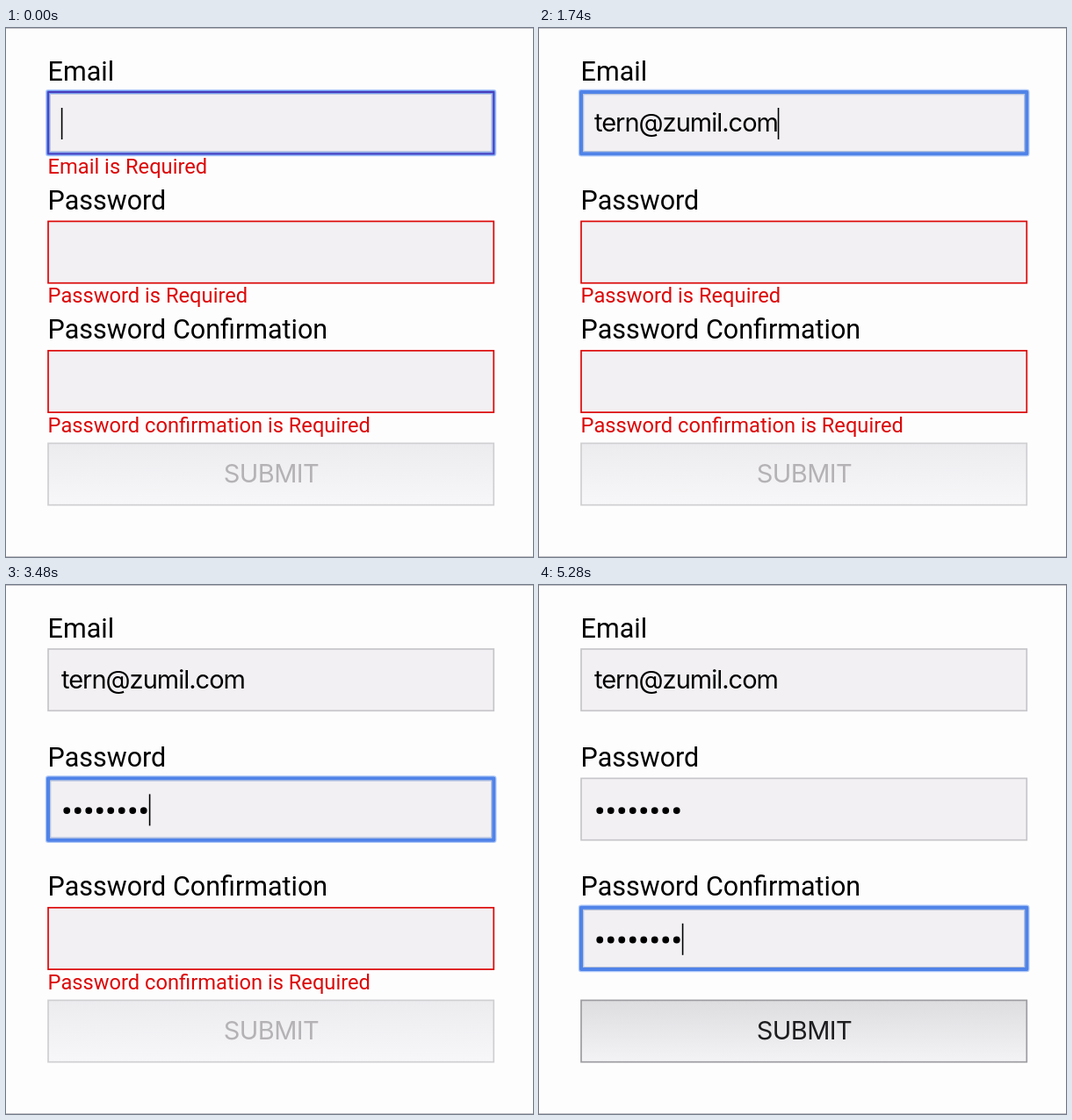
An HTML page with a canvas that plays this animation: 600 by 603 pixels, repeating every 5.34 s.

```html
<!DOCTYPE html>
<html lang="en">
<head>
<meta charset="utf-8">
<title>Form validation</title>
<style>
  html, body { margin: 0; width: 100%; height: 100%; overflow: hidden; background: #fefdfe; }
  canvas { display: block; width: 600px; height: 603px; }
</style>
</head>
<body>
<canvas id="stage" width="600" height="603"></canvas>
<script>
const ctx = document.getElementById('stage').getContext('2d');
const LOOP = 5340;
const LEFT = 48, WIDTH = 507.3, HEIGHT = 70.3, TEXT_X = 63;
const DOT_STEP = 12.5, DOTS = 8;

const EMAIL = 'tern@zumil.com';
const KEY_TIMES = [60, 120, 180, 240, 900, 1020, 1140, 1260, 1340, 1440, 1540, 1620, 1680, 1740];
const FOCUS_TIMES = [0, 1920, 3780];
const CARET_OFF = [[660, 900], [2460, 2760], [3780, 3960], [4680, 5280]];

const LABEL = '30.5px Roboto, sans-serif';
const ERROR = '23.7px Roboto, sans-serif';
const INPUT = '29px Inter, sans-serif';
const RED = '#dc0808';

const fieldTop = i => 73 + 147.4 * i;
const dotCount = (t, start, step) =>
  t < start ? 0 : Math.min(DOTS, Math.floor((t - start) / step) + 1);

function text(str, x, y, font, color, spacing = 0) {
  ctx.font = font;
  ctx.letterSpacing = spacing + 'px';
  ctx.fillStyle = color;
  ctx.fillText(str, x, y);
  return ctx.measureText(str).width;
}

function outline(y, width, color, inset = 0) {
  ctx.lineWidth = width;
  ctx.strokeStyle = color;
  ctx.strokeRect(LEFT + inset, y + inset, WIDTH - 2 * inset, HEIGHT - 2 * inset);
}

function focusRing(y, valid) {
  ctx.lineJoin = 'round';
  if (valid) {
    outline(y, 6.4, 'rgba(120,165,245,.6)');
    outline(y, 4, '#5083e8');
    outline(y, 1, '#bcc4d6', 2.6);
  } else {
    outline(y, 6, 'rgba(125,170,248,.6)');
    outline(y, 4, 'rgba(85,135,240,.7)');
    outline(y, 1, '#c3c9d8', 2.4);
    outline(y, 1.8, '#4a3cbc');
  }
  ctx.lineJoin = 'miter';
}

function dots(n, y) {
  ctx.fillStyle = '#000';
  for (let i = 0; i < n; i++) {
    ctx.beginPath();
    ctx.arc(TEXT_X + DOT_STEP * (i + 0.5), y + 36.7, 3.9, 0, 2 * Math.PI);
    ctx.fill();
  }
  return n * DOT_STEP;
}

function field(i, { label, value, error }, focused, caretOn) {
  const y = fieldTop(i);
  text(label, 47.6, y - 13.5, LABEL, '#000');
  ctx.fillStyle = '#f2f0f3';
  ctx.fillRect(LEFT, y, WIDTH, HEIGHT);
  if (focused) focusRing(y, !error);
  else outline(y, 1.7, error ? RED : '#c6c5c9');
  if (error) text(error, 47.6, y + 93, ERROR, RED);

  const width = typeof value === 'number'
    ? dots(value, y)
    : text(value, TEXT_X, y + 45.3, INPUT, '#000', -1);
  if (focused && caretOn) {
    ctx.fillStyle = '#000';
    ctx.fillRect(TEXT_X + width - 0.2, y + 18, 1.6, 36);
  }
}

function button(enabled) {
  const y = 473.4;
  const fill = ctx.createLinearGradient(0, y, 0, y + HEIGHT);
  fill.addColorStop(0, enabled ? '#dddcdf' : '#ecebee');
  fill.addColorStop(1, enabled ? '#f3f2f4' : '#f7f6f8');
  ctx.fillStyle = fill;
  ctx.fillRect(LEFT, y, WIDTH, HEIGHT);
  outline(y, 1.7, enabled ? '#9d9ca0' : '#cfced1');
  ctx.textAlign = 'center';
  text('SUBMIT', 302, 518.3, INPUT, enabled ? '#1d1c1f' : '#b4b2b5', -0.6);
  ctx.textAlign = 'left';
}

function emailError(value) {
  if (!value) return 'Email is Required';
  return /@./.test(value) ? '' : 'Email is mailformed';
}

function draw(t) {
  ctx.fillStyle = '#fefdfe';
  ctx.fillRect(0, 0, 600, 603);
  ctx.fillStyle = '#c3c2c6';
  ctx.fillRect(0, 0, 600, 1);
  ctx.fillRect(0, 602, 600, 1);

  const email = EMAIL.slice(0, KEY_TIMES.filter(k => k <= t).length);
  const password = dotCount(t, 2760, 68);
  const confirm = dotCount(t, 3960, 34);
  const focus = FOCUS_TIMES.filter(f => f <= t).length - 1;
  const caretOn = !CARET_OFF.some(([from, to]) => t >= from && t < to);

  const fields = [
    { label: 'Email', value: email, error: emailError(email) },
    { label: 'Password', value: password, error: password ? '' : 'Password is Required' },
    { label: 'Password Confirmation', value: confirm,
      error: confirm ? '' : 'Password confirmation is Required' }
  ];
  fields.forEach((f, i) => field(i, f, i === focus, caretOn));
  button(confirm === DOTS);
}

const start = performance.now();
function tick() {
  draw((performance.now() - start) % LOOP);
  requestAnimationFrame(tick);
}
tick();
</script>
</body>
</html>
```
